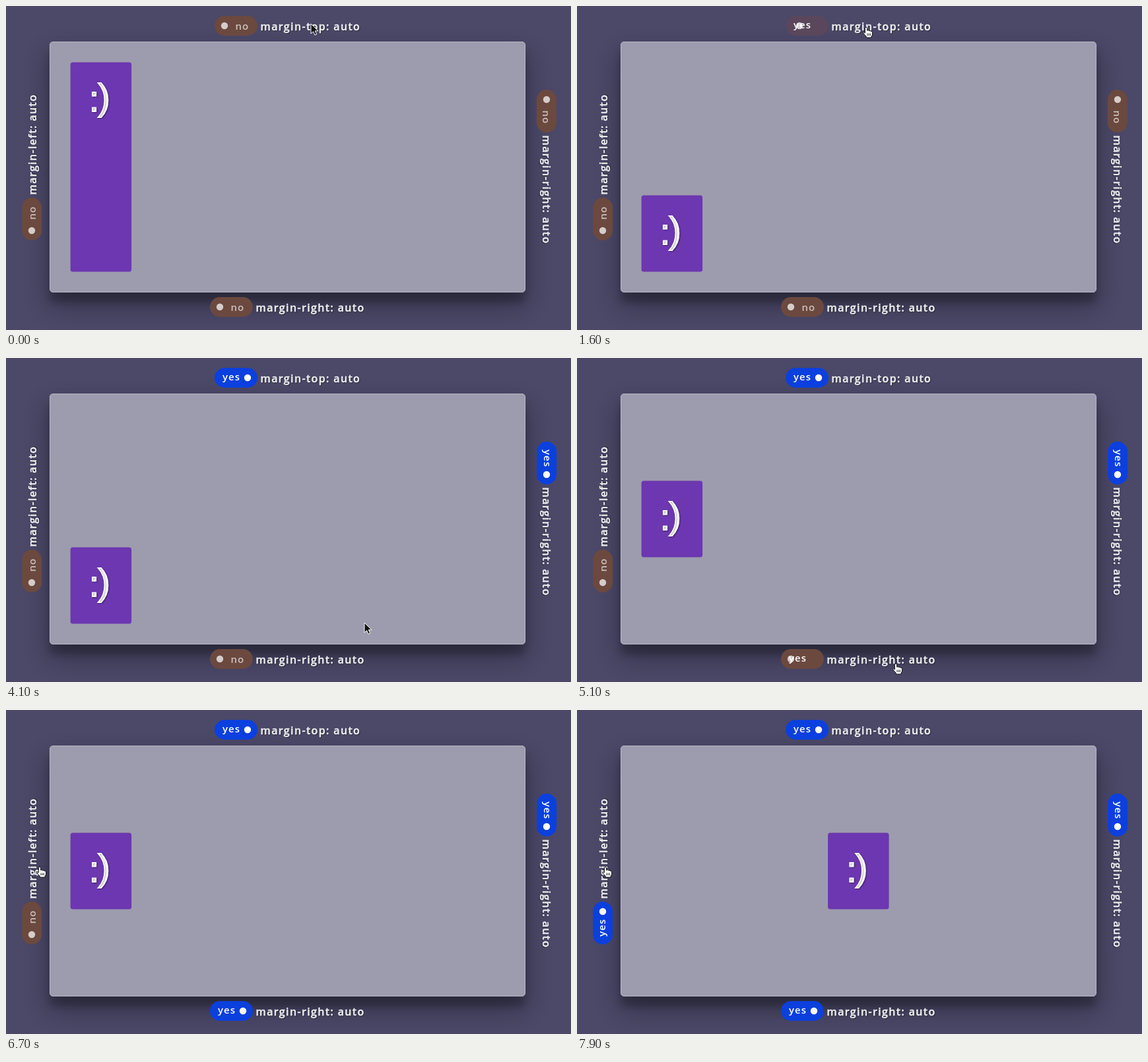
These frames come from a looping animation (856x492 px, 8 s). An HTML page:

```html
<!DOCTYPE html>
<html lang="en">
<head>
<meta charset="utf-8">
<title>Auto margins</title>
<style>
  html, body { margin: 0; width: 100%; height: 100%; overflow: hidden; background: #4b4868; }
  #panel {
    position: absolute; left: 66px; top: 54px; width: 721px; height: 381px;
    box-sizing: border-box; border: 1px solid #b9b7c6; border-radius: 5px; background: #9d9cae;
    box-shadow: 0 19px 38px rgba(0, 0, 0, .32), 0 15px 12px rgba(0, 0, 0, .22);
  }
  svg { position: absolute; left: 0; top: 0; }
  .label, .state { font: 600 16px "Open Sans", sans-serif; letter-spacing: 1.35px; fill: #fff; }
  .label { stroke: #fff; stroke-width: .4; text-shadow: 1px 1px 1px rgba(0, 0, 0, .35); }
  .state { font-size: 15px; letter-spacing: 1px; }
  .face { font: 56px "Liberation Sans", Arial, sans-serif; fill: #fff; stroke: #fff; stroke-width: 1.8;
    text-shadow: 1px 1px 2px rgba(0, 0, 0, .35); }
</style>
</head>
<body>
<div id="panel"></div>
<svg id="stage" width="856" height="492" viewBox="0 0 856 492">
  <g id="box">
    <rect id="card" width="92.5" rx="3.5" fill="#6c37b0"/>
    <text class="face" x="28.2" y="75">:<tspan dx="-2" dy="-3">)</tspan></text>
  </g>
  <g id="labels"></g>
  <g id="ring" fill="none">
    <circle r="31" stroke="#fff" stroke-opacity=".45"/>
    <circle r="29.8" stroke="#111" stroke-width="1.6"/>
  </g>
  <g id="cursor">
    <path id="arrow" d="M0 0V15L3.6 11.8L6 17.2L8.6 16L6.3 10.8H11Z" fill="#111" stroke="#fff"/>
    <g id="hand">
      <path d="M-1.6 9V1.2Q0-1 1.6 1.2V5.2Q3.2 4 4.6 5.7Q6.2 4.7 7.2 6.4Q9.4 5.6 9.6 8V11Q9.3 13 8 14.3V16H.2V14.2Q-2.2 11.7-4.4 8.8Q-4.2 6.6-1.6 9Z" fill="#fff" stroke="#111"/>
      <path d="M2 9.5V13M4.2 9.5V13M6.4 9.5V13" stroke="#111" stroke-width=".9"/>
    </g>
  </g>
</svg>
<script>
const LOOP = 8000, FADE = 380, RING = 400;
const NS = "http://www.w3.org/2000/svg";
const $ = id => document.getElementById(id);

// x, y, turn, caption, moment of switching, hit area [left, top, right, bottom]
const items = [
  { x: 316, y: 15, turn: 0, text: "margin-top: auto", at: 1500, hit: [316, 14, 537, 47] },
  { x: 834, y: 127, turn: 90, text: "margin-right: auto", at: 3300, hit: [803, 127, 835, 361] },
  { x: 309, y: 442, turn: 0, text: "margin-right: auto", at: 5100, hit: [309, 441, 544, 474] },
  { x: 24, y: 356, turn: -90, text: "margin-left: auto", at: 7500, hit: [23, 133, 56, 357] }
];
const [top_, right, bottom, left] = items;

// time, x, y of the pointer tip
const path = [
  [0, 462, 27], [100, 461, 27], [900, 438, 32], [1800, 438, 32], [2200, 771, 251],
  [2350, 771, 251], [2650, 818, 266], [3550, 818, 266], [4100, 543, 402], [4500, 483, 464],
  [5700, 483, 464], [6500, 51, 238], [6850, 51, 238], [7100, 43, 238], [LOOP, 43, 238]
];

function add(parent, name, attrs, text) {
  const el = document.createElementNS(NS, name);
  for (const k in attrs) el.setAttribute(k, attrs[k]);
  if (text) el.textContent = text;
  parent.appendChild(el);
  return el;
}

for (const it of items) {
  const g = add($("labels"), "g", { transform: `translate(${it.x} ${it.y}) rotate(${it.turn})` });
  it.pill = add(g, "rect", { width: 65, height: 30, rx: 15 });
  it.dot = add(g, "circle", { cy: 15, r: 5.2, fill: "#fff" });
  it.no = add(g, "text", { class: "state", x: 31.5, y: 21, opacity: .66 }, "no");
  it.yes = add(g, "text", { class: "state", x: 12, y: 19 }, "yes");
  add(g, "text", { class: "label", x: 69.5, y: 21.5 }, it.text);
}

const clamp = v => Math.max(0, Math.min(1, v));
const ease = p => p * p * (3 - 2 * p);
const mix = (a, b, p) => a + (b - a) * p;
const place = (el, x, y) => el.setAttribute("transform", `translate(${x} ${y})`);
const show = (el, on) => el.setAttribute("visibility", on ? "visible" : "hidden");

function pointer(t) {
  const i = path.findIndex(p => p[0] > t);
  const [t0, x0, y0] = path[i - 1], [t1, x1, y1] = path[i];
  const p = ease((t - t0) / (t1 - t0));
  return [mix(x0, x1, p), mix(y0, y1, p)];
}

function drawToggle(it, t) {
  const p = ease(clamp((t - it.at) / FADE));
  const rgb = [mix(107, 11, p), mix(73, 64, p), mix(63, 222, p)].map(Math.round);
  it.pill.setAttribute("fill", `rgb(${rgb})`);
  it.dot.setAttribute("cx", mix(15, 50, p));
  it.dot.setAttribute("opacity", mix(.72, 1, p));
  show(it.no, t < it.at);
  show(it.yes, t >= it.at);
}

function drawBox(t) {
  const on = it => t >= it.at;
  const h = on(top_) || on(bottom) ? 116 : 318;
  const free = 318 - h;
  const y = on(top_) ? (on(bottom) ? free / 2 : free) : 0;
  const x = on(left) ? (on(right) ? 282.5 : 565) : 0;
  place($("box"), 97.6 + x, 85.4 + y);
  $("card").setAttribute("height", h);
}

function draw(t) {
  items.forEach(it => drawToggle(it, t));
  drawBox(t);
  const [x, y] = pointer(t);
  const over = t >= 100 && items.some(({ hit: [l, u, r, b] }) => x > l && x < r && y > u && y < b);
  place($("cursor"), x, y);
  place($("ring"), x, y);
  show($("hand"), over);
  show($("arrow"), !over);
  show($("ring"), items.some(it => t >= it.at - RING && t < it.at - 100));
}

const start = performance.now();
function tick() {
  draw((performance.now() - start) % LOOP);
  requestAnimationFrame(tick);
}
tick();
</script>
</body>
</html>
```
